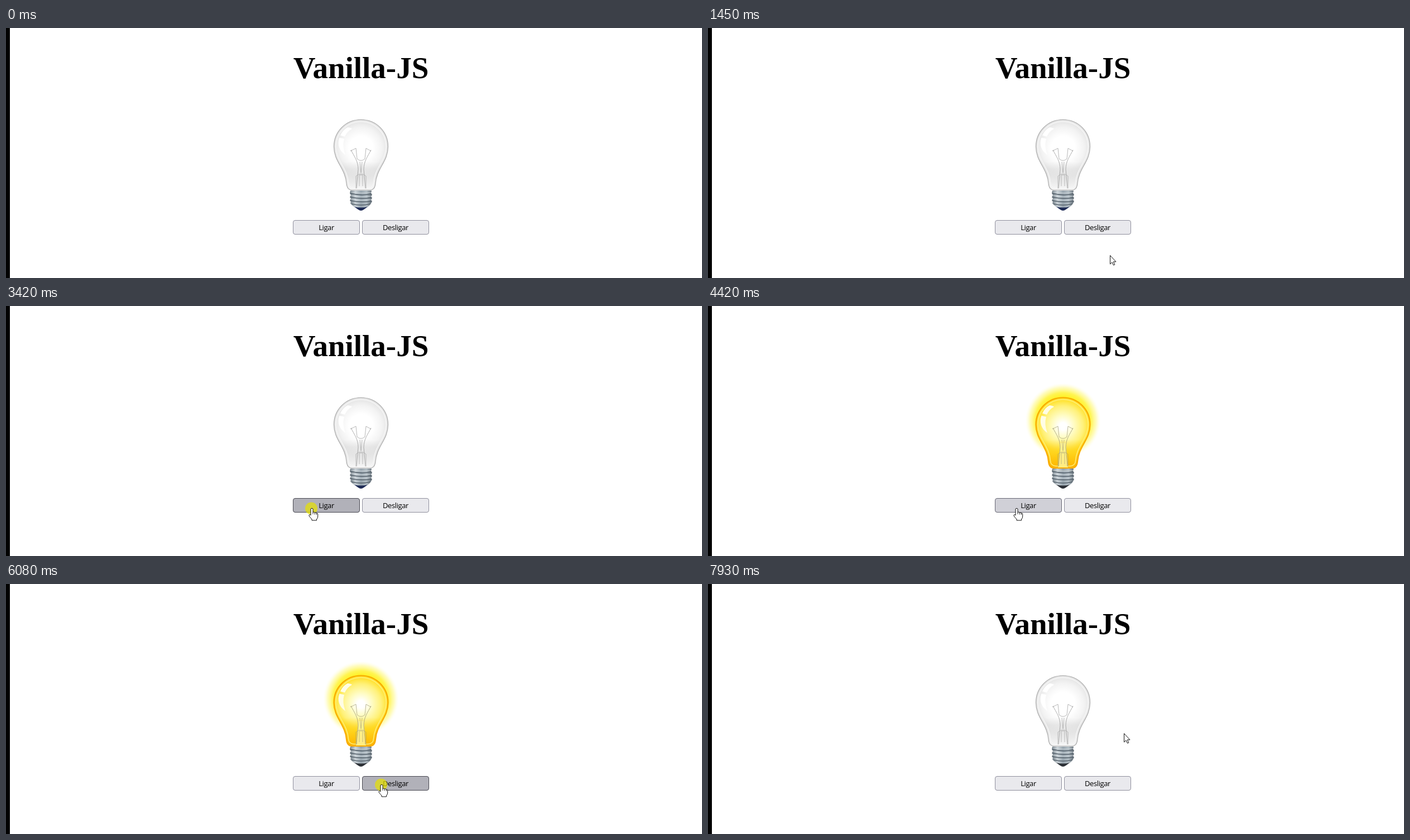
Write an HTML page that moves like this. It is 1247 by 449 pixels and loops after 7.99 s.

```html
<!DOCTYPE html>
<html lang="pt">
<head>
<meta charset="utf-8">
<title>Vanilla-JS</title>
<style>
html, body { margin: 0; width: 100%; height: 100%; overflow: hidden; background: #fff; }
svg { display: block; width: 1247px; height: 449px; }
.title { font: bold 55px "Liberation Serif", "Times New Roman", serif; }
.label { font: 13px "Open Sans", "Noto Sans", sans-serif; letter-spacing: -.4px; }
text { text-anchor: middle; }
</style>
</head>
<body>
<svg viewBox="0 0 1247 449">
  <defs>
    <radialGradient id="glow" gradientUnits="userSpaceOnUse" cx="636" cy="206" r="68">
      <stop offset=".6" stop-color="#fff01c"/>
      <stop offset=".74" stop-color="#fff440" stop-opacity=".9"/>
      <stop offset=".88" stop-color="#fff98c" stop-opacity=".55"/>
      <stop offset="1" stop-color="#fffde0" stop-opacity="0"/>
    </radialGradient>
    <radialGradient id="glassOn" gradientUnits="userSpaceOnUse" cx="636" cy="216" r="66">
      <stop offset=".1" stop-color="#fff"/>
      <stop offset=".3" stop-color="#fffcc4"/>
      <stop offset=".55" stop-color="#fff17a"/>
      <stop offset=".72" stop-color="#ffe22e"/>
      <stop offset="1" stop-color="#ffc400"/>
    </radialGradient>
    <radialGradient id="glassOff" gradientUnits="userSpaceOnUse" cx="636" cy="216" r="54">
      <stop offset=".4" stop-color="#fff"/>
      <stop offset=".7" stop-color="#f3f3f3"/>
      <stop offset="1" stop-color="#dedede"/>
    </radialGradient>
    <linearGradient id="neckOff" x1="0" y1="0" x2="0" y2="1">
      <stop offset="0" stop-color="#dedede" stop-opacity="0"/>
      <stop offset=".25" stop-color="#dedede" stop-opacity=".55"/>
      <stop offset="1" stop-color="#f8f8f8"/>
    </linearGradient>
    <linearGradient id="neckOn" x1="0" y1="0" x2="0" y2="1">
      <stop offset="0" stop-color="#ffd21a" stop-opacity="0"/>
      <stop offset=".45" stop-color="#ffd21a" stop-opacity=".8"/>
      <stop offset="1" stop-color="#fdb400"/>
    </linearGradient>
    <linearGradient id="metal">
      <stop offset="0" stop-color="#66727b"/>
      <stop offset=".25" stop-color="#ccd4d9"/>
      <stop offset=".5" stop-color="#98a5ae"/>
      <stop offset=".75" stop-color="#b3bec5"/>
      <stop offset="1" stop-color="#5a656e"/>
    </linearGradient>
    <path id="glass" d="M636 164.500C663 164.500 684.500 186 684.500 213C684.500 240 664 252 662 279Q661 291 652 291H620Q611 291 610 279C608 252 587.500 240 587.500 213C587.500 186 609 164.500 636 164.500Z"/>
    <clipPath id="inside"><use href="#glass"/></clipPath>
    <path id="rim" fill="none" d="M591 213C591 188 611 168 636 168S681 188 681 213C681 238 660 252 658.500 278Q658 287 649 287.500H623Q614 287 613.500 278C612 252 591 238 591 213Z"/>
    <path id="shine" d="M599 193Q603 183 612 178.500Q618 179 620 181Q611 186 607 195ZM597.500 197L606 199Q602 212 608 228C597 221 593 208 597.500 197Z"/>
    <g id="filament" fill="none">
      <path d="M618 219C624 231 631 239 631 254L628 288M654 219C648 231 641 239 641 254L644 288" stroke-width=".8"/>
      <path d="M617 221L627 216L629 235Q636 241 643 235L645 216L654 221" stroke-width=".7"/>
      <path d="M627 288V266Q636 258 645 266V288M633 284V264H639V284M634 240L636 260L638 240" stroke-width=".6"/>
    </g>
  </defs>

  <path d="M0 0H7V449H0Z"/>
  <text class="title" x="636" y="90">Vanilla-JS</text>

  <g id="off">
    <use href="#glass" fill="url(#glassOff)"/>
    <path d="M585 240H690V292H585Z" fill="url(#neckOff)" clip-path="url(#inside)"/>
    <use href="#rim" stroke="#f6f6f6" stroke-width="1.500"/>
    <use href="#shine" fill="#fff"/>
    <use href="#filament" stroke="#999"/>
    <use href="#glass" fill="none" stroke="#aaa" stroke-width="1.200"/>
  </g>
  <g id="on">
    <path d="M569 139.500H703V274H569Z" fill="url(#glow)"/>
    <use href="#glass" fill="url(#glassOn)"/>
    <path d="M585 240H690V292H585Z" fill="url(#neckOn)" clip-path="url(#inside)"/>
    <path d="M631 246H641L645 290H627Z" fill="#fff69c" opacity=".85"/>
    <use href="#rim" stroke="#ffee79" stroke-width="1.500"/>
    <use href="#shine" fill="#fffde5"/>
    <use href="#filament" stroke="#9c9878"/>
    <use href="#glass" fill="none" stroke="#f8aa00" stroke-width="2.200"/>
  </g>

  <path d="M617 292H655L654 297L656 299L654 303L656 305L654 309L656 311L654 315L651 319L641 326H631L621 319L617 315L618 312L616 310L618 306L616 304L618 300L616 297Z" fill="url(#metal)"/>
  <path d="M617 297Q636 302 655 298M617 303.500Q636 308 655 304.500M617 310Q636 314 655 311M619 316Q636 320 653 316" fill="none" stroke="#59656f" stroke-width="1.400"/>
  <path d="M618 294.500Q636 298 654 295M618 301Q636 305 654 302M618 307.500Q636 311 654 308" fill="none" stroke="#d6dde2" stroke-width=".8"/>
  <path id="tip" d="M624 321Q636 324 648 321L641 326Q636 330 631 326Z"/>

  <g id="buttons"></g>
  <circle id="click" r="11" fill="#e6e000" opacity=".72"/>
  <path id="arrow" d="M.5.500V16L4 12.700L6.500 18L8.800 17L6.400 11.800H11Z" fill="#fff" stroke="#111" stroke-linejoin="round"/>
  <g id="hand" stroke="#111" stroke-linejoin="round">
    <path d="M-2 2.200Q-2 .4 0 .4T2 2.200V7.500Q3.500 6.300 5.300 8Q7 7.200 8.400 9Q10.700 8.700 10.700 11.200V15Q10.700 18 8.500 20V22H0V20Q-2 18-5 14Q-5.500 11.500-3.300 11.500L-2 13Z" fill="#fff"/>
    <path d="M2 7V11M5.300 8V11.500M8.400 9V12" fill="none" stroke-width=".9"/>
  </g>
</svg>
<script>
const LOOP = 7990;
const el = id => document.getElementById(id);
const show = (id, on) => el(id).style.display = on ? '' : 'none';

// fill and border for idle, hover and pressed
const LOOKS = [['#e9e9ed', '#8f8f9d'], ['#d0d0d7', '#676774'], ['#b1b1b9', '#484851']];
const buttons = [
  { x: 514, label: 'Ligar', from: 3420, to: 3470 },
  { x: 638, label: 'Desligar', from: 6080, to: 6140 }
];
el('buttons').innerHTML = buttons.map(b =>
  `<rect x="${b.x + .5}" y="345.5" width="119" height="25" rx="3.500"/>
   <text class="label" x="${b.x + 60}" y="363">${b.label}</text>`).join('');
const rects = document.querySelectorAll('#buttons rect');

// pointer stations: time, x, y
const route = [
  [410, 1161, 439], [1170, 807, 394], [1450, 719, 408], [2000, 572, 383],
  [2610, 548, 363], [4283, 548, 363], [5090, 641, 361], [5550, 671, 360],
  [5700, 671, 360], [5880, 673, 360], [6543, 673, 360], [6700, 699, 384],
  [6957, 777, 415], [7130, 848, 406], [7270, 891, 374], [7370, 884, 340],
  [7590, 838, 299], [7930, 745, 268]
];
// bursts of pointer steps: start, end, count
const bursts = [[410, 2000, 24], [2070, 2610, 9], [4350, 5090, 12],
  [5150, 5550, 7], [5750, 5880, 2], [6610, 7930, 20]];

function snap(t) {
  const burst = bursts.filter(b => b[0] <= t).pop();
  if (!burst) return 0;
  const [start, end, count] = burst;
  const step = (end - start) / (count - 1);
  return Math.min(end, start + Math.floor((t - start) / step + .15) * step);
}

function slope(i, k) {
  const a = route[Math.max(i - 1, 0)], b = route[i];
  const c = route[Math.min(i + 1, route.length - 1)];
  const still = (p, q) => p !== q && p[1] === q[1] && p[2] === q[2];
  return still(a, b) || still(b, c) ? 0 : (c[k] - a[k]) / (c[0] - a[0]);
}

function pointer(t) {
  let i = 0;
  while (i < route.length - 2 && route[i + 1][0] <= t) i++;
  const a = route[i], b = route[i + 1], d = b[0] - a[0];
  const u = Math.min(1, Math.max(0, (t - a[0]) / d)), v = 1 - u;
  return [1, 2].map(k => Math.round(
    v * v * (1 + 2 * u) * a[k] + u * u * (3 - 2 * u) * b[k] +
    u * v * d * (v * slope(i, k) - u * slope(i + 1, k))));
}

function draw(t) {
  const [x, y] = pointer(snap(t));
  const onRow = y > 345 && y < 371 && x > 514 && x < 758;
  const lit = t >= 3470 && t < 6140;
  let pressed = false;
  buttons.forEach((b, i) => {
    const down = t >= b.from && t < b.to;
    const over = onRow && x > b.x + 4 && x < b.x + 120;
    const [fill, stroke] = LOOKS[down ? 2 : over ? 1 : 0];
    rects[i].setAttribute('fill', fill);
    rects[i].setAttribute('stroke', stroke);
    pressed = pressed || down;
  });
  show('on', lit);
  show('off', !lit);
  el('tip').setAttribute('fill', t < 3470 ? '#1d2a55' : '#2c3036');
  show('click', pressed);
  show('hand', onRow);
  show('arrow', !onRow && t >= 410);
  for (const id of ['hand', 'arrow']) el(id).setAttribute('transform', `translate(${x} ${y})`);
  el('click').setAttribute('transform', `translate(${x - 1} ${y + .5})`);
}

const begin = performance.now();
function tick() {
  draw((performance.now() - begin) % LOOP);
  requestAnimationFrame(tick);
}
tick();
</script>
</body>
</html>
```
